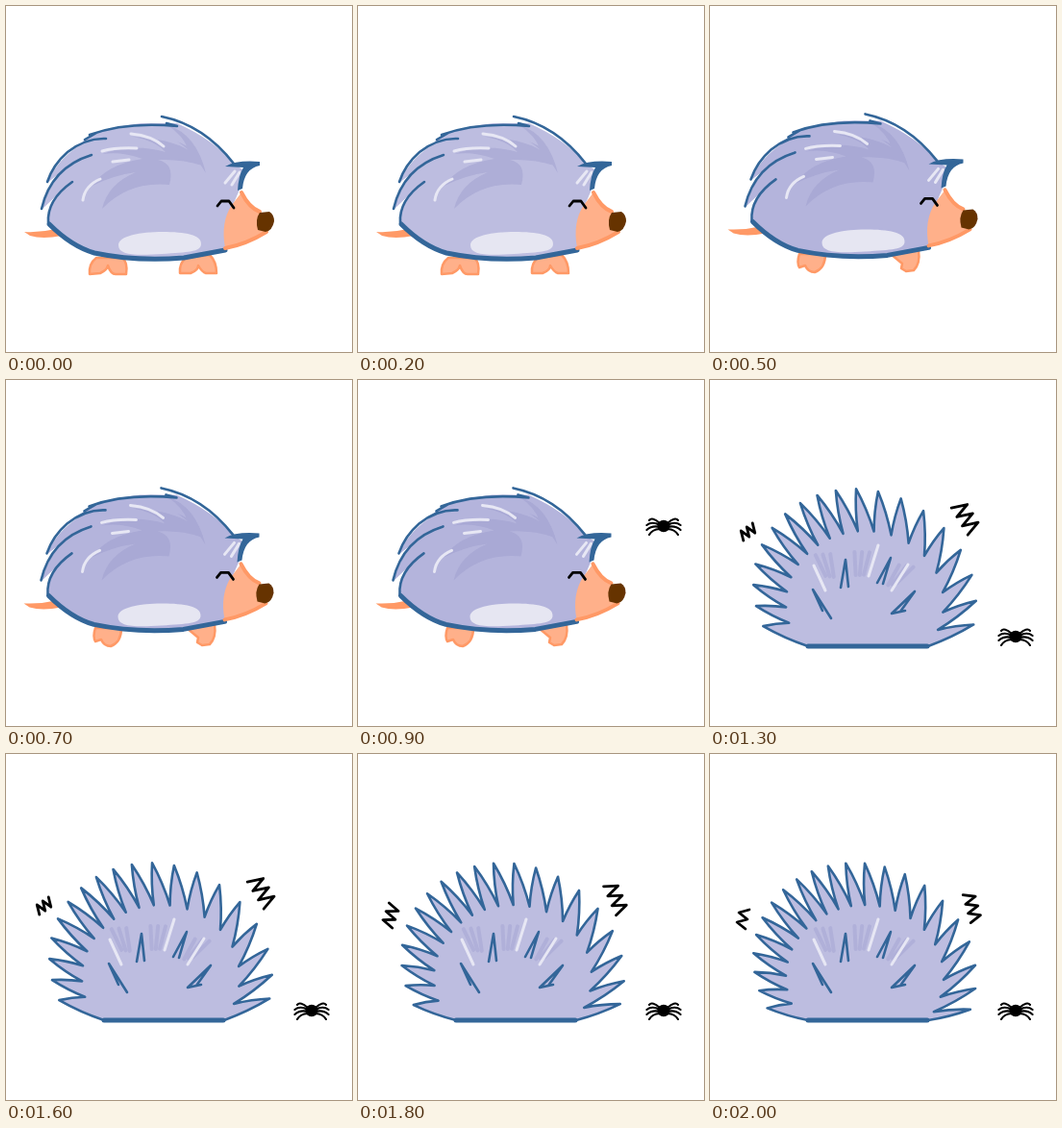
Recreate the animation shown at these times as an HTML page. Size 360 by 360 pixels, loop 2100 ms.

```html
<!DOCTYPE html>
<html lang="en">
<head>
<meta charset="utf-8">
<title>Hedgehog and spider</title>
<style>
html, body { margin: 0; width: 100%; height: 100%; overflow: hidden; background: #fff; }
svg { display: block; width: 100vw; height: 100vh; --coat: #bdbde0; --fur: #aeaed7; }
path { stroke-linejoin: round; stroke-linecap: round; }

.b, .jump { --coat: #b4b4dc; --fur: #a9a9d5; }
.body { fill: var(--coat); }
.fur { fill: var(--fur); }
.line, .edge { stroke: #336699; stroke-width: 2.6; }
.line { fill: none; }
.line.wide { stroke-width: 5; }
.blue { fill: #336699; }
.hatch { fill: none; stroke: #b0b0d9; stroke-width: 4; }
.shine { fill: none; stroke: #e7e7f4; stroke-width: 3; }
.belly { fill: #e6e6f2; }
.skin { fill: #ffb08a; stroke: #ff9966; stroke-width: 2.5; }
.peach { fill: #ff9966; }
.rim { fill: none; stroke: #ff9966; stroke-width: 4; }
.nose { fill: #663300; }
.ink { fill: none; stroke: #000; stroke-width: 2.8; }
.legs { stroke-width: 2.1; }

.a, .b, .jump, .ball, .pose, .spider { opacity: 0; animation: 2100ms step-end infinite; }
.a { animation-name: step-a; }
.b { animation-name: step-b; }
.jump { animation-name: leap; }
.ball { animation-name: curl; }
.pose { animation-name: shiver; animation-duration: 300ms; }
.pose:nth-of-type(2) { animation-delay: -200ms; }
.pose:nth-of-type(3) { animation-delay: -100ms; }
.spider { animation-name: drop; }

@keyframes step-a {
  0%, 9.523%, 19.047%, 28.571%, 38.095% { opacity: 1; }
  4.761%, 14.285%, 23.809%, 33.333%, 42.857% { opacity: 0; }
}
@keyframes step-b {
  0%, 9.523%, 19.047%, 28.571%, 38.095%, 52.38% { opacity: 0; }
  4.761%, 14.285%, 23.809%, 33.333%, 42.857% { opacity: 1; }
}
@keyframes leap { 0%, 57.142% { opacity: 0; } 52.38% { opacity: 1; } }
@keyframes curl { 0% { opacity: 0; } 57.142%, 100% { opacity: 1; } }
@keyframes shiver { 0% { opacity: 1; } 33.33%, 100% { opacity: 0; } }
@keyframes drop {
  0% { opacity: 0; transform: none; }
  38.095% { opacity: 1; transform: translateY(-229px); }
  42.857% { opacity: 1; transform: translateY(-115px); }
  52.38%, 100% { opacity: 1; transform: none; }
}
</style>
</head>
<body>
<svg viewBox="0 0 360 360">
  <defs>
    <g id="walker">
      <path class="peach" d="M19 235Q35 236 52 232L58 239Q38 243 25 239Z"/>
      <path class="body" d="M43 226Q44 207 60 190L38 211Q44 186 62 169L43 184Q53 160 78 144L82 138Q104 126 140 122L178 122Q216 139 237 164L246 170L243 191L234 212L228 253Q186 264 135 263Q88 260 66 245Z"/>
      <path class="fur" d="M168 124Q198 133 208 174Q194 150 178 141Q202 150 204 166Q184 159 158 160Q176 164 170 186Q128 182 100 211Q106 185 135 173Q112 176 90 187Q104 165 142 159Q120 151 100 154Q132 142 166 152Q155 140 132 136Q170 138 190 150Q184 134 168 124Z"/>
      <path class="belly" d="M117 249C117 239 140 235 163 235S204 238 203 248C202 256 190 256 162 258C134 260 117 259 117 249Z"/>
      <path class="shine" d="M130 133Q152 135 164 146M100 151Q114 147 136 148M111 162L128 160M98 180Q82 187 80 202M228 184L238 172M235 186L243 173"/>
      <path class="line" d="M162 115Q206 124 237 164M87 134Q125 120 178 125L167 122M104 138Q83 137 64 152Q49 165 43 183M82 139L94 132M89 155Q47 168 37 211M69 183Q42 202 44 226"/>
      <path class="line wide" d="M45 227Q68 250 92 257Q135 266 185 262L228 254"/>
      <path class="blue" d="M228 167Q240 160 264 162L264 166Q248 169 246 190L241 192Q242 176 247 168Z"/>
      <path fill="#ffb08a" d="M245 194Q253 210 264 214L272 234Q252 249 228 252Q223 225 235 207Z"/>
      <path class="rim" d="M245 194Q253 210 264 214M271 235Q250 248 228 252"/>
      <path class="nose" d="M264 215L274 214Q279 217 279 224Q277 234 270 235L262 233Q259 222 264 215Z"/>
      <path class="ink" d="M220 208L224 203L232 203L237 210"/>
    </g>
  </defs>

  <g class="a">
    <path class="skin" d="M94 262Q86 268 87 279L98 278Q105 275 106 270Q109 279 114 279L125 279Q127 267 121 262Z"/>
    <path class="skin" d="M187 262Q180 268 181 278L192 278Q200 275 200 270Q204 277 208 278L219 278Q219 266 212 259Z"/>
    <use href="#walker"/>
  </g>

  <g class="b">
    <path class="skin" d="M93 258Q90 267 93 272L99 270Q102 277 109 277Q120 273 120 258Z"/>
    <path class="skin" d="M188 258L200 268L199 273L204 276L212 275Q219 268 217 254Z"/>
    <use href="#walker" transform="translate(-.5 -2.6)"/>
  </g>

  <g class="jump">
    <path class="peach" d="M81 273Q85 260 95 250L106 252Q94 260 81 273Z"/>
    <path class="skin" d="M133 225Q150 226 171 230L171 239Q160 245 140 242Z"/>
    <path class="skin" d="M130 240Q144 246 158 244Q162 251 156 257Q145 259 130 247Z"/>
    <path class="body" d="M246 139L243 160L254 168L222 195Q185 196 163 208Q130 229 122 256L95 250Z"/>
    <path class="body edge" id="back"/>
    <path class="fur" d="M143 91Q174 96 203 115L180 112L209 129Q170 123 118 133Q145 118 166 118L130 109L166 107ZM170 140Q124 144 94 180L122 171L112 181Q140 165 152 151L134 153ZM113 139Q140 129 170 131L84 164Z"/>
    <path class="shine" d="M152 96Q166 100 175 105M117 118L156 117M103 141Q124 136 140 127M85 165Q108 155 124 150"/>
    <path class="belly" d="M132 222L136 204L150 194L161 191L178 186L200 183L202 195Q164 202 139 224Z"/>
    <path class="body edge" d="M246 148L271 115L256 146L281 129L252 162"/>
    <path class="blue" d="M122 258L92 250L124 249Q131 223 161 206Q190 193 224 194L224 197Q190 200 167 212Q134 233 122 258Z"/>
    <path class="blue" d="M176 71Q196 74 203 90Q188 84 176 71Z"/>
    <path class="skin" d="M194 201Q190 214 199 222Q211 230 223 224Q227 212 216 200Z"/>
    <path class="skin" d="M218 200L238 201Q240 210 234 214L224 213Z"/>
    <path class="skin" d="M218 194Q222 179 242 174L254 164Q263 174 265 189L257 203Q240 194 218 194Z"/>
    <path class="nose" d="M258 189L266 187L274 192L273 203L266 208L256 206L255 195Z"/>
    <path d="M231 158L240 156L246 161L244 170L236 176L228 173L226 166Z"/>
    <circle cx="238" cy="164" r="4" fill="#fff"/>
  </g>

  <g class="ball">
    <g class="pose"><path class="body edge"/><path class="ink"/></g>
    <g class="pose"><path class="body edge"/><path class="ink"/></g>
    <g class="pose"><path class="body edge"/><path class="ink"/></g>
    <path class="hatch" id="hatch"/>
    <path class="shine" d="M108 193L120 219M175 172L165 204M206 192L189 219"/>
    <path class="line" d="M126 248L107 218L117 240M136 216L141 187L144 215M174 211L188 185L180 212M203 240L189 243L213 220L198 241"/>
    <path class="line wide" d="M102 277H226"/>
  </g>

  <g class="spider">
    <path class="ink legs" id="legs"/>
    <ellipse cx="318" cy="267" rx="6.5" ry="6.2"/>
  </g>
</svg>
<script>
const { sin, cos, PI, hypot } = Math;
const draw = (el, d) => el.setAttribute('d', d);
const byId = id => document.getElementById(id);
const line = pts => 'M' + pts.map(p => p.join(' ')).join('L');

// Slightly bowed edges through alternating valleys and tips.
function bowed(pts) {
  let d = `M${pts[0]}`;
  for (let i = 1; i < pts.length; i++) {
    const [x0, y0] = pts[i - 1], [x, y] = pts[i];
    d += `Q${(x + x0) / 2 + (y - y0) * .05} ${(y + y0) / 2 - (x - x0) * .05} ${x} ${y}`;
  }
  return d;
}

// Angle runs clockwise from the left side, in degrees.
function onOval(cy, rx, ry, deg) {
  const a = deg * PI / 180;
  return [161 - rx * cos(a), cy - ry * sin(a)];
}

function curled({ n, from, to }) {
  const angle = i => {
    const u = i / (n - 1);
    return from + (to - from) * u - 16 * sin(PI * u ** 1.4) ** 2;
  };
  const pts = [[102, 277]];
  for (let i = 0; i < n; i++) {
    const t = angle(i), r = 1.02 + .05 * sin(t * PI / 90);
    pts.push(onOval(222, 113 * r, 106 * r, t));
    if (i < n - 1) pts.push(onOval(232, 82, 75, (t + angle(i + 1)) / 2 - 3 + 16 * i / n));
  }
  return bowed([...pts, [227, 277]]) + 'Z';
}

function squiggle([x0, y0, x1, y1, amp, n]) {
  const len = hypot(x1 - x0, y1 - y0);
  const nx = (y0 - y1) / len * amp, ny = (x1 - x0) / len * amp;
  return line(Array.from({ length: n }, (_, i) => {
    const u = i / (n - 1), side = i % 2 ? -1 : 1;
    return [x0 + (x1 - x0) * u + nx * side, y0 + (y1 - y0) * u + ny * side];
  }));
}

// Spikes swept backwards along a guide curve.
function swept(guide, n) {
  const path = document.createElementNS('http://www.w3.org/2000/svg', 'path');
  draw(path, guide);
  const len = path.getTotalLength();
  const at = s => path.getPointAtLength(s * len);
  const pts = [];
  for (let i = 0; i <= n; i++) {
    const u = i / n, p = at(u);
    pts.push([p.x, p.y]);
    if (i === n) break;
    const q = at(u + .01), k = hypot(q.x - p.x, q.y - p.y);
    const tx = (q.x - p.x) / k, ty = (q.y - p.y) / k;
    const out = 24 - 14 * u * u, back = 12 + 8 * u;
    pts.push([p.x + ty * out - tx * back, p.y - tx * out - ty * back]);
  }
  return bowed(pts);
}

const poses = [
  { n: 20, from: -22, to: 200, marks: [[30, 179, 38, 157, 6, 6], [262, 135, 275, 165, 7, 7]] },
  { n: 19, from: -19, to: 197, marks: [[32, 163, 47, 153, 5, 6], [258, 129, 275, 157, 8, 7]] },
  { n: 22, from: -24, to: 203, marks: [[32, 181, 36, 161, 5, 5], [269, 145, 277, 174, 6, 7]] },
];
document.querySelectorAll('.pose').forEach((g, i) => {
  draw(g.children[0], curled(poses[i]));
  draw(g.children[1], poses[i].marks.map(squiggle).join(''));
});

draw(byId('back'), swept('M91 248C60 190 84 118 128 94S228 72 248 138', 14));

// Three fans of short strokes.
let fans = '';
for (const [x, y, lean] of [[121, 193, -.3], [157, 191, .1], [197, 203, .65]]) {
  for (let k = -1; k <= 1; k++) {
    const a = lean + k * .15, dx = 12 * sin(a), dy = 12 * cos(a), cx = x + k * 6;
    fans += line([[cx + dx, y - dy], [cx - dx, y + dy]]);
  }
}
draw(byId('hatch'), fans);

let legs = '';
for (const s of [-1, 1]) {
  for (let k = 0; k < 4; k++) {
    const foot = 318 + s * (15 + 3 * sin(PI * k / 3));
    legs += `M${318 + 4 * s} ${264 + 2 * k}Q${318 + 12 * s} ${257 + 4.5 * k} ${foot} ${261 + 5 * k}`;
  }
}
draw(byId('legs'), legs);
</script>
</body>
</html>
```
